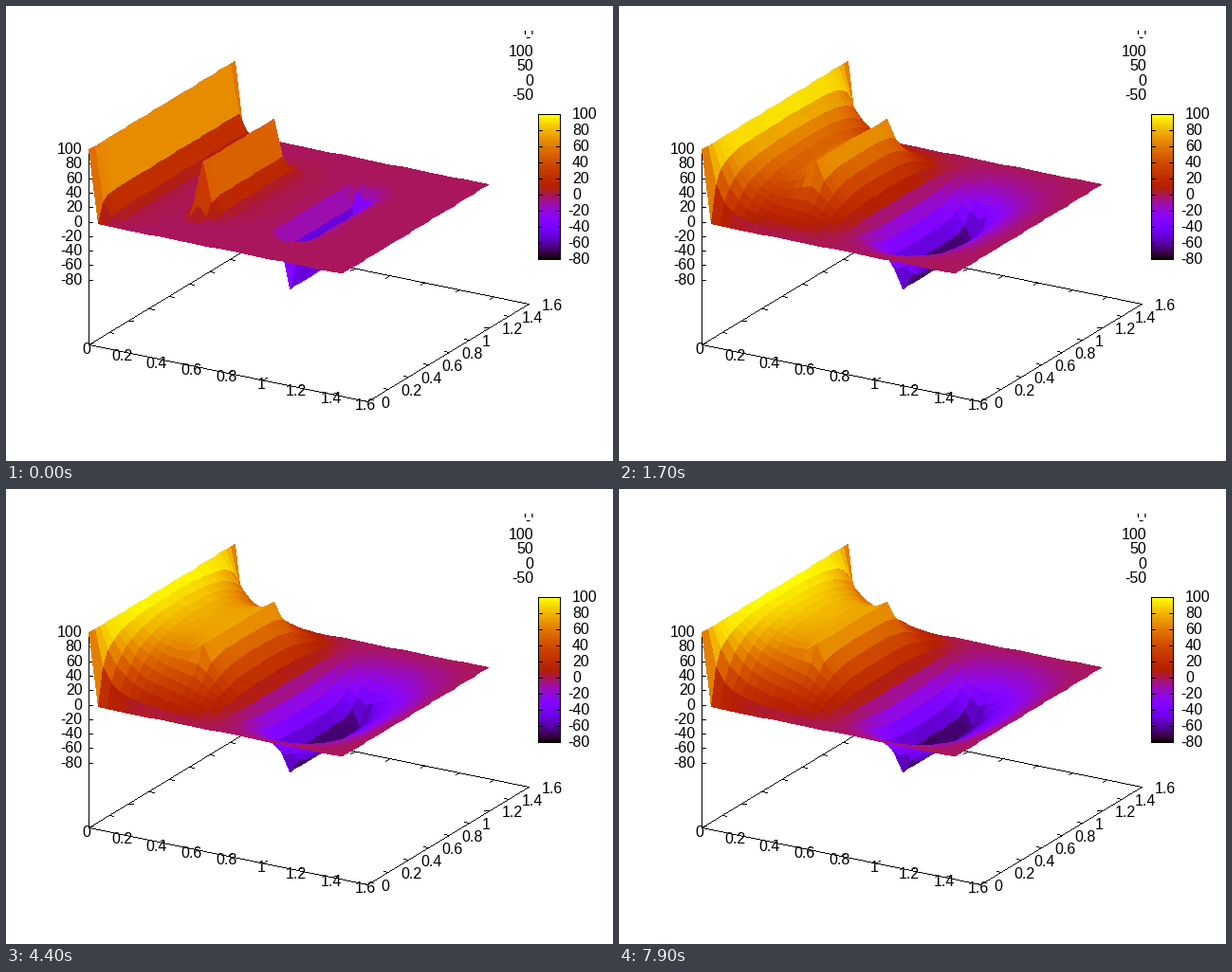
Animation, 640 px wide and 480 px high, one loop 8 s. Source, as a matplotlib script:

```python
import numpy as np
import matplotlib.pyplot as plt
from matplotlib.animation import FuncAnimation
from matplotlib.collections import PolyCollection

W, H = 640, 480
N, STEP, SPAN = 30, 0.05, 1.6
FRAMES, INTERVAL = 80, 100
ZMIN, ZMAX = -80, 100
SHADES = 128
ZTOP, ZBASE = 151.2, 357.3
ZUNIT = (ZBASE - ZTOP) / 1.5 / (ZMAX - ZMIN)

ORIGIN = np.array([87.9, ZBASE])
XVEC = np.array([294.0, 59.5]) / SPAN
YVEC = np.array([169.8, -103.1]) / SPAN


def base(x, y):
    return ORIGIN + x * XVEC + y * YVEC


def height(z):
    return ZTOP + (ZMAX - z) * ZUNIT


def palette(v):
    t = np.clip((np.asarray(v, float) - ZMIN) / (ZMAX - ZMIN), 0, 1)
    t = np.minimum(np.floor(t * SHADES) / (SHADES - 1), 1)
    blue = np.clip(np.sin(2 * np.pi * t), 0, 1)
    return np.stack([np.sqrt(t), t ** 3, blue], axis=-1)


def relax(count):
    """Potential after each Gauss-Seidel sweep of the Laplace equation."""
    v = np.zeros((N, N))
    fixed = np.zeros((N, N), bool)
    v[0] = 100
    for col, volts in ((9, 75), (19, -75)):
        v[col, 7:22] = volts
        fixed[col, 7:22] = True
    g = v.tolist()
    free = [(i, j) for i in range(1, N - 1) for j in range(1, N - 1)
            if not fixed[i, j]]
    states = []
    for _ in range(count):
        for i, j in free:
            g[i][j] = (g[i - 1][j] + g[i + 1][j] + g[i][j - 1] + g[i][j + 1]) / 4
        states.append(np.array(g))
    return states


STATES = relax(FRAMES)

# Grid cells from the farthest to the nearest
J, I = [a.ravel() for a in np.meshgrid(np.arange(N - 2, -1, -1),
                                       np.arange(N - 1), indexing="ij")]
CI = np.stack([I, I + 1, I + 1, I], axis=1)
CJ = np.stack([J, J, J + 1, J + 1], axis=1)
PX = np.floor(ORIGIN[0] + STEP * (CI * XVEC[0] + CJ * YVEC[0]))
PY = STEP * (CI * XVEC[1] + CJ * YVEC[1])

plt.rcParams["font.family"] = "Liberation Sans"
fig = plt.figure(figsize=(W / 72, H / 72), dpi=72, facecolor="white")
ax = fig.add_axes([0, 0, 1, 1])
ax.axis("off")
backdrop = np.ones((H, W, 3))


def line(p, q):
    """Black one-pixel line without smoothing."""
    p = np.array([np.floor(p[0]), np.rint(p[1])])
    q = np.array([np.floor(q[0]), np.rint(q[1])])
    n = int(np.abs(q - p).max()) + 1
    x, y = np.rint(np.linspace(p, q, n)).astype(int).T
    backdrop[y, x] = 0


def label(x, y, text, ha):
    ax.text(x, y + 5.5, text, ha=ha, va="baseline", fontsize=16, color="black")


def num(v):
    return f"{v:g}"


def draw_box():
    corners = [base(0, 0), base(SPAN, 0), base(SPAN, SPAN), base(0, SPAN)]
    for k in range(4):
        line(corners[k], corners[(k + 1) % 4])
    line((ORIGIN[0], ZTOP), ORIGIN)
    xtic, ytic = np.array([4.2, -2.6]), np.array([4.6, 0.9])
    for k in range(9):
        u = 0.2 * k
        near, far = base(u, 0), base(u, SPAN)
        left, right = base(0, u), base(SPAN, u)
        line(near, near + xtic)
        line(far, far - xtic)
        line(left, left + ytic)
        line(right, right - ytic)
        label(near[0] - 3.2, near[1] + 3.4, num(u), "center")
        label(right[0] + 12.8, right[1] + 1, num(u), "left")
    for z in range(ZMIN, ZMAX + 1, 20):
        y = height(z)
        line((ORIGIN[0], y), (ORIGIN[0] + 4, y))
        label(80, y - 1, num(z), "right")


def draw_colorbar():
    x0, x1, y0, y1 = 561, 584, 114, 267
    ramp = palette(np.linspace(ZMAX, ZMIN, y1 - y0 + 1))
    backdrop[y0:y1 + 1, x0:x1 + 1] = ramp[:, None, :]
    for y in (y0, y1):
        line((x0, y), (x1, y))
    for x in (x0, x1):
        line((x, y0), (x, y1))
    for z in range(ZMIN, ZMAX + 1, 20):
        y = y0 + (ZMAX - z) / (ZMAX - ZMIN) * (y1 - y0)
        line((x0, y), (x0 + 4, y))
        line((x1 - 4, y), (x1, y))
        label(592 if z < 0 else 596.4, y - 1, num(z), "left")


def draw_key():
    for k, text in enumerate(("'-'", "100", "50", "0", "-50")):
        label(556, 32 + 15.2 * k, text, "right")


draw_box()
draw_colorbar()
draw_key()
ax.imshow(backdrop, extent=(-0.5, W - 0.5, H - 0.5, -0.5), aspect="auto",
          interpolation="nearest", zorder=0)
surface = PolyCollection([], antialiaseds=False, linewidths=0, zorder=2)
ax.add_collection(surface)
ax.set_xlim(-0.5, W - 0.5)
ax.set_ylim(H - 0.5, -0.5)


def update(n):
    v = STATES[n][CI, CJ]
    surface.set_verts(np.stack([PX, np.rint(PY + height(v))], axis=-1))
    surface.set_facecolor(palette(v.mean(axis=1)))
    return surface,


anim = FuncAnimation(fig, update, frames=FRAMES, interval=INTERVAL,
                     repeat=True, repeat_delay=0, blit=False)
plt.show()
```
